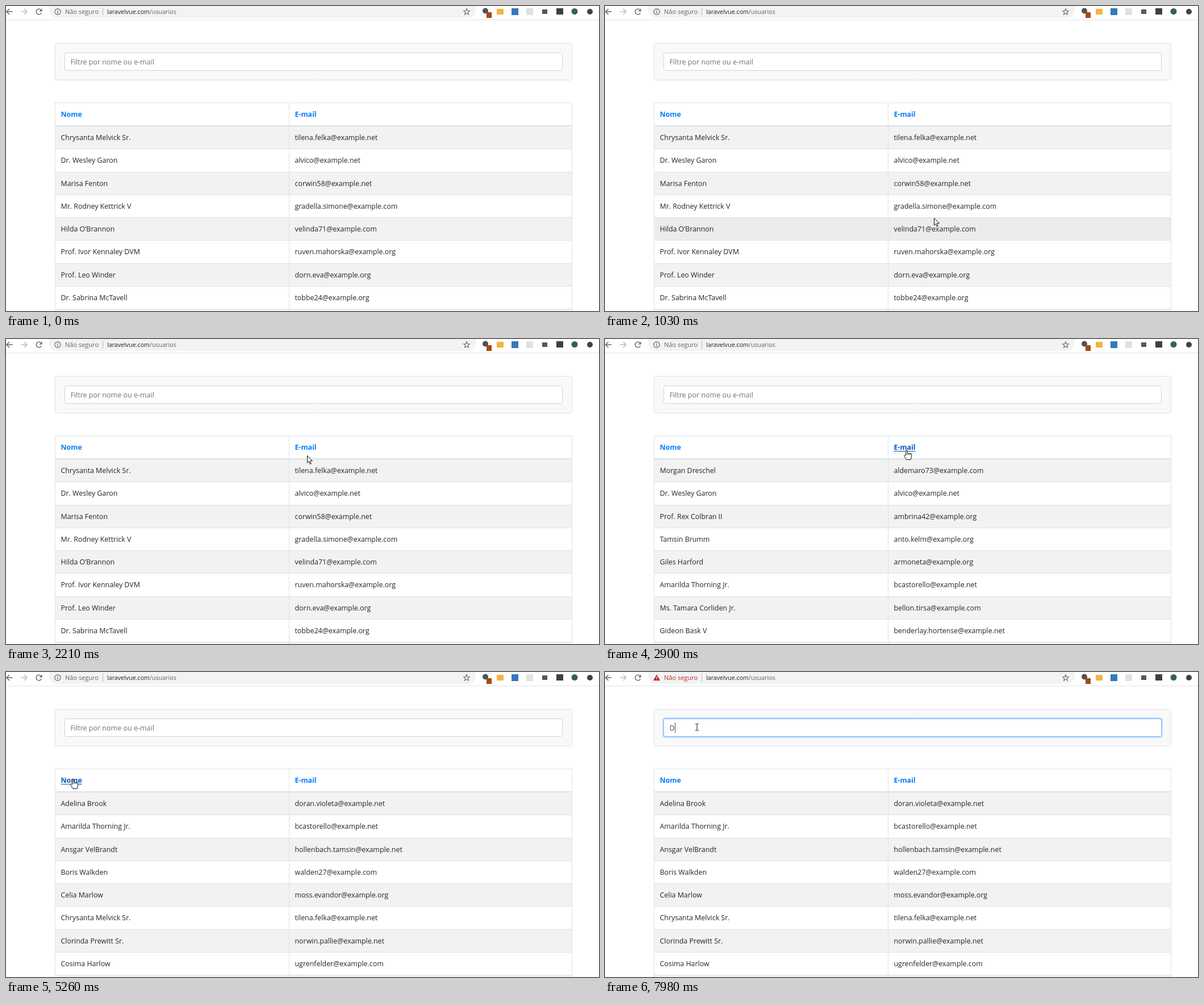
Animation, 1044 px wide and 537 px high, one loop 8 s. Source, as an HTML page with a canvas:

```html
<!DOCTYPE html>
<html lang="pt">
<head>
<meta charset="utf-8">
<title>Usuários</title>
<style>
html, body { margin: 0; width: 100%; height: 100%; overflow: hidden; background: #fff; }
canvas { display: block; }
</style>
</head>
<body>
<canvas id="stage" width="1044" height="537"></canvas>
<script>
const ctx = document.getElementById('stage').getContext('2d');
const LOOP = 8000;
const FONT = '"Open Sans", "Noto Sans", sans-serif';
const ROW_TOP = 211, ROW_H = 40.25, LEFT = 86.5, RIGHT = 996.5, SPLIT = 498.5;
const GREY = '#5f6368', INK = '#212529', LINE = '#dee2e6';

const unsorted = [
  ['Chrysanta Melvick Sr.', 'tilena.felka@example.net'],
  ['Dr. Wesley Garon', 'alvico@example.net'],
  ['Marisa Fenton', 'corwin58@example.net'],
  ['Mr. Rodney Kettrick V', 'gradella.simone@example.com'],
  ['Hilda O’Brannon', 'velinda71@example.com'],
  ['Prof. Ivor Kennaley DVM', 'ruven.mahorska@example.org'],
  ['Prof. Leo Winder', 'dorn.eva@example.org'],
  ['Dr. Sabrina McTavell', 'tobbe24@example.org']
];
const byEmail = [
  ['Morgan Dreschel', 'aldemaro73@example.com'],
  unsorted[1],
  ['Prof. Rex Colbran II', 'ambrina42@example.org'],
  ['Tamsin Brumm', 'anto.kelm@example.org'],
  ['Giles Harford', 'armoneta@example.org'],
  ['Amarilda Thorning Jr.', 'bcastorello@example.net'],
  ['Ms. Tamara Corliden Jr.', 'bellon.tirsa@example.com'],
  ['Gideon Bask V', 'benderlay.hortense@example.net']
];
const byName = [
  ['Adelina Brook', 'doran.violeta@example.net'],
  byEmail[5],
  ['Ansgar VelBrandt', 'hollenbach.tamsin@example.net'],
  ['Boris Walkden', 'walden27@example.com'],
  ['Celia Marlow', 'moss.evandor@example.org'],
  unsorted[0],
  ['Clorinda Prewitt Sr.', 'norwin.pallie@example.net'],
  ['Cosima Harlow', 'ugrenfelder@example.com']
];

// Screen refreshes: start, end, number of steps.
const refreshes = [
  [0, 0, 1], [710, 1500, 11], [1580, 2370, 11], [2440, 2440, 1], [2670, 2670, 1],
  [2900, 2900, 1], [3620, 3620, 1], [3840, 4630, 11], [4710, 4860, 3], [5180, 5330, 3],
  [5740, 5970, 4], [6200, 6340, 3], [6420, 6650, 4], [6970, 7120, 3], [7500, 7500, 1],
  [7920, 7980, 2]
];

// Pointer path: time, x, y.
const path = [
  [710, 745, 535], [940, 643, 406], [1100, 515, 340], [1260, 408, 287], [1500, 283, 203],
  [1580, 300, 203], [1900, 430, 208], [2210, 530, 205], [2370, 530, 200],
  [2440, 526, 185], [2670, 531, 187], [2900, 531, 195], [3620, 531, 197],
  [3840, 527, 206], [4230, 237, 202], [4630, 119, 201], [4710, 117, 197],
  [4860, 118, 190], [5180, 118, 188], [5330, 117, 189], [5740, 117, 196],
  [5970, 114, 222], [6200, 111, 212], [6340, 153, 141], [6500, 158, 116], [6650, 162, 97]
];

function snap(t) {
  const [a, b, n] = refreshes.filter(r => r[0] <= t).pop();
  if (n === 1) return a;
  const gap = (b - a) / (n - 1);
  let s = a;
  for (let i = 0; i < n; i++) {
    const at = Math.floor((a + i * gap) / 10) * 10;
    if (at <= t) s = at;
  }
  return s;
}

function pointerAt(t) {
  const i = path.findIndex(p => p[0] > t);
  if (i === 0) return { x: path[0][1], y: path[0][2] };
  if (i < 0) return { x: path[path.length - 1][1], y: path[path.length - 1][2] };
  const a = path[i - 1], b = path[i], k = (t - a[0]) / (b[0] - a[0]);
  return { x: a[1] + (b[1] - a[1]) * k, y: a[2] + (b[2] - a[2]) * k };
}

function text(str, x, y, size, color, weight = 400) {
  ctx.font = `${weight} ${size}px ${FONT}`;
  ctx.fillStyle = color;
  ctx.fillText(str, x, y);
  return ctx.measureText(str).width;
}

function rect(x, y, w, h, color) {
  ctx.fillStyle = color;
  ctx.fillRect(x, y, w, h);
}

function rounded(x, y, w, h, r, fill, stroke) {
  ctx.beginPath();
  ctx.roundRect(x, y, w, h, r);
  if (fill) { ctx.fillStyle = fill; ctx.fill(); }
  if (stroke) { ctx.strokeStyle = stroke; ctx.lineWidth = 1; ctx.stroke(); }
}

function poly(pts, fill, stroke, width = 1, close = true) {
  ctx.beginPath();
  pts.forEach(([x, y]) => ctx.lineTo(x, y));
  if (close) ctx.closePath();
  if (fill) { ctx.fillStyle = fill; ctx.fill(); }
  if (stroke) { ctx.strokeStyle = stroke; ctx.lineWidth = width; ctx.stroke(); }
}

function disc(x, y, r, fill, stroke) {
  ctx.beginPath();
  ctx.arc(x, y, r, 0, Math.PI * 2);
  if (fill) { ctx.fillStyle = fill; ctx.fill(); }
  if (stroke) { ctx.strokeStyle = stroke; ctx.lineWidth = 1.2; ctx.stroke(); }
}

function navArrow(x, dir, color) {
  poly([[x - dir * 5.5, 10], [x + dir * 5, 10]], null, color, 1.5, false);
  poly([[x, 5], [x + dir * 5, 10], [x, 15]], null, color, 1.5, false);
}

function toolbar(danger) {
  rounded(76, -12, 751, 33, 14, '#f1f3f4');
  rect(0, 24, 1044, 1, '#e1e3e6');
  navArrow(6, -1, GREY);
  navArrow(32, 1, '#babcbe');

  ctx.beginPath();
  ctx.arc(58, 10, 4.8, 0.5, 5.4);
  ctx.strokeStyle = GREY;
  ctx.lineWidth = 1.5;
  ctx.stroke();
  poly([[63.5, 4.5], [63.5, 9.5], [58.5, 9.5]], GREY);

  const state = danger ? '#c5221f' : GREY;
  if (danger) {
    poly([[91, 4.5], [97, 15], [85, 15]], state);
    rect(90.4, 8, 1.2, 3.4, '#fff');
    rect(90.4, 12.3, 1.2, 1.2, '#fff');
  } else {
    disc(91, 10, 5.2, null, state);
    rect(90.4, 9.3, 1.3, 3.6, state);
    rect(90.4, 7, 1.3, 1.3, state);
  }
  text('Não seguro', 104, 14, 11, state);
  rect(170, 3, 1, 14, '#b9bcc0');
  const w = text('laravelvue.com', 178, 14, 10.7, '#202124');
  text('/usuarios', 178 + w, 14, 10.7, GREY);

  const star = [];
  for (let i = 0; i < 10; i++) {
    const r = i % 2 ? 2.4 : 5.6, a = i * Math.PI / 5 - Math.PI / 2;
    star.push([811 + r * Math.cos(a), 10.4 + r * Math.sin(a)]);
  }
  poly(star, null, GREY, 1.1);

  disc(844, 8.5, 5, '#4d5459');
  rect(846, 11, 9, 10, '#a34a12');
  rect(864, 5, 12, 10, '#f1b544');
  rect(890, 4, 12, 12, '#3479b8');
  rect(916, 4, 12, 12, '#dfe1e2');
  rect(944, 6, 9, 8, '#55595d');
  rect(969, 4, 12, 11, '#3c4043');
  disc(1001, 9.5, 5.5, '#34605f');
  disc(1028, 10, 5, '#3f4346');
}

function search(t) {
  rounded(LEFT, 65.5, RIGHT - LEFT, 65, 3, '#f8f9f9', '#dfe1e2');
  const focus = t < 6970 ? 0 : Math.min(1, 0.2 + (t - 6970) / 150 * 0.8);
  if (focus) rounded(103.5 - 2.5 * focus, 82.5 - 2.5 * focus, 876 + 5 * focus, 31 + 5 * focus,
    3 + 2 * focus, `rgba(0,123,255,${0.25 * focus})`);
  const mix = (a, b) => Math.round(a + (b - a) * focus);
  rounded(103.5, 82.5, 876, 31, 3, '#fff', `rgb(${mix(206, 128)},${mix(212, 189)},${mix(218, 255)})`);

  const typed = t >= 7920;
  if (typed) text('D', 113.5, 103, 12.5, '#495057');
  else text('Filtre por nome ou e-mail', 113.5, 103, 12.5, '#6c757d');
  if (typed) rect(123, 89, 1, 18, '#495057');
  else if (t >= 6970 && t < 7500) rect(114, 89, 1, 18, '#495057');
}

function heading(str, x, hot) {
  const color = hot ? '#0056b3' : '#007bff';
  const w = text(str, x, 195, 12.4, color, 700);
  if (hot) rect(x, 197, w, 1, color);
}

function table(t, link) {
  const rows = t < 2900 ? unsorted : t < 5180 ? byEmail : byName;
  // The row highlight trails the pointer slightly.
  const y = pointerAt(t - 13).y;
  const hover = t >= 710 && t < 2400 ? Math.floor((y - ROW_TOP) / ROW_H) : -1;
  for (let i = 0; i < 9; i++) {
    const top = Math.round(ROW_TOP + i * ROW_H);
    const fill = i === hover ? '#ececec' : i % 2 ? '#fff' : '#f2f2f2';
    rect(87, top, 909, 41, fill);
    rect(86, top, 911, 1, LINE);
    if (!rows[i]) continue;
    const base = Math.round(236 + i * ROW_H);
    text(rows[i][0], 96.5, base, 12.4, INK);
    text(rows[i][1], 508.5, base, 12.4, INK);
  }
  rect(86, 170, 911, 1, LINE);
  rect(86, 210, 911, 1.5, LINE);
  for (const x of [LEFT, SPLIT, RIGHT]) rect(x - 0.5, 170, 1, 367, LINE);
  heading('Nome', 96.5, link === 'name');
  heading('E-mail', 508.5, link === 'email');
}

function arrow() {
  poly([[0.5, 0.5], [0.5, 13], [3.3, 10.4], [5.4, 15.3], [7.3, 14.5], [5.2, 9.7], [9.3, 9.5]],
    '#fff', '#111', 1);
}

function hand() {
  ctx.beginPath();
  ctx.moveTo(-1.2, 10);
  ctx.lineTo(-1.2, 1.6);
  ctx.quadraticCurveTo(0, -0.4, 1.2, 1.6);
  ctx.lineTo(1.2, 6);
  for (const x of [3.7, 6.2, 8.7]) ctx.quadraticCurveTo(x - 1, 4.8 + x / 9, x, 7);
  ctx.lineTo(8.7, 12);
  ctx.lineTo(7.2, 17.3);
  ctx.lineTo(-0.5, 17.3);
  ctx.lineTo(-4.3, 10.8);
  ctx.quadraticCurveTo(-4, 8, -1.2, 10);
  ctx.closePath();
  ctx.fillStyle = '#fff';
  ctx.fill();
  ctx.strokeStyle = '#111';
  ctx.lineWidth = 1;
  ctx.stroke();
  for (const x of [1.2, 3.7, 6.2]) poly([[x, 6.5], [x, 9]], null, '#111', 0.9, false);
}

function beam() {
  rect(-0.6, -6, 1.2, 12, '#333');
  for (const y of [-6.5, 5.5]) {
    rect(-3, y, 2.4, 1.1, '#333');
    rect(0.6, y, 2.4, 1.1, '#333');
  }
}

function linkUnder({ x, y }) {
  if (y < 180 || y >= 200) return '';
  if (x > 96 && x < 135) return 'name';
  return x > 508 && x < 549 ? 'email' : '';
}

function draw(now) {
  const t = snap(now % LOOP);
  const p = pointerAt(t);
  const link = t < 710 ? '' : linkUnder(p);
  rect(0, 0, 1044, 537, '#fff');
  toolbar(t >= 7980);
  search(t);
  table(t, link);
  if (t >= 710) {
    ctx.save();
    ctx.translate(Math.round(p.x), Math.round(p.y));
    if (link) hand();
    else if (p.y > 82 && p.y < 114) beam();
    else arrow();
    ctx.restore();
  }
}

let start;
function tick(now) {
  start ??= now;
  draw(Math.max(0, now - start));
  requestAnimationFrame(tick);
}
draw(0);
requestAnimationFrame(tick);
</script>
</body>
</html>
```
